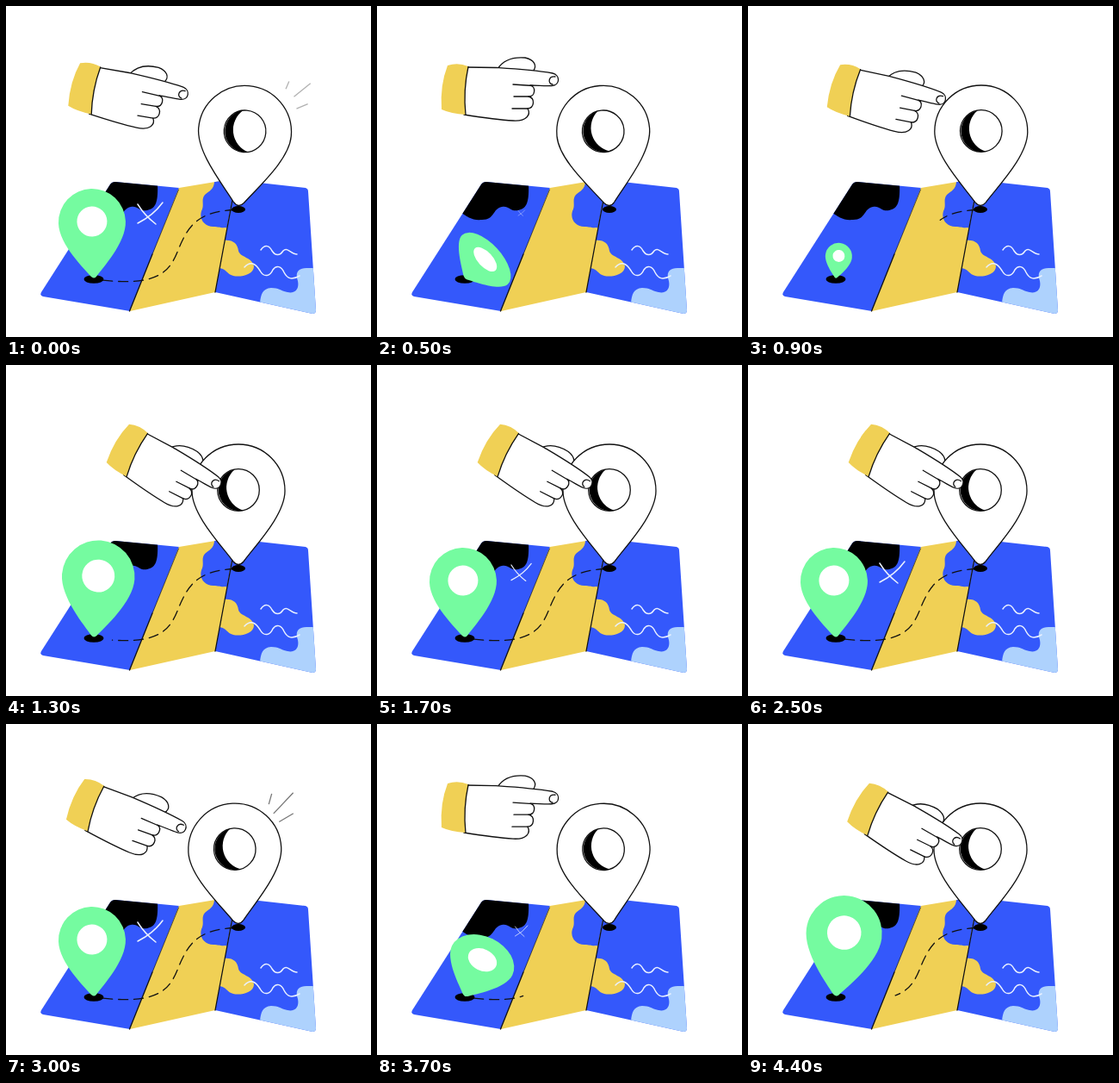
Recreate the animation shown at these times as an HTML page. Size 424 by 384 pixels, loop 4500 ms.

```html
<!DOCTYPE html>
<html lang="en">
<head>
<meta charset="utf-8">
<title>Map route</title>
<style>
  html, body { margin: 0; width: 100%; height: 100%; overflow: hidden; background: #fff; }
  svg { display: block; width: 424px; height: 384px; }
  .line { fill: none; stroke: #111; stroke-width: 1.3; stroke-linecap: round; stroke-linejoin: round; }
  .paper { fill: #fff; }
  .blue { fill: #3458fb; }
  .yellow { fill: #f0d055; }
  .chalk { fill: none; stroke: #e9f0ff; stroke-width: 1.5; stroke-linecap: round; }
</style>
</head>
<body>
<svg viewBox="0 0 424 384">
  <defs>
    <clipPath id="leftPanel"><path d="M127 204L201 211L144 354L43 337Q39 336 41 332L121 207Q123 204 127 204Z"/></clipPath>
    <clipPath id="rightPanel"><path d="M267 202L348 211Q351 212 351 215L360 353Q360 357 356 357L243 332Z"/></clipPath>
    <clipPath id="middlePanel"><path d="M201 211L267 200L243 332L144 354Z"/></clipPath>
    <path id="route" d="M266 236.500C225 238 213 254 203 276S190 327 112 318"/>
    <mask id="routeMask" maskUnits="userSpaceOnUse" x="0" y="0" width="424" height="384">
      <path id="reveal" fill="none" stroke="#fff" stroke-width="8" pathLength="100"/>
    </mask>
  </defs>

  <g clip-path="url(#leftPanel)">
    <rect class="blue" x="35" y="195" width="175" height="165"/>
    <path d="M95 238C106 245 110 249 122 248C137 248 134 235 145 233C153 231 155 239 164 237C174 235 177 228 176 205L100 195Z"/>
  </g>
  <g clip-path="url(#middlePanel)">
    <rect class="yellow" x="140" y="195" width="130" height="165"/>
    <path class="blue" d="M242 200C243 213 236 214 231 219C226 225 231 231 227 238C224 248 231 256 241 256C248 256 250 258 254 257L260 258L272 195Z"/>
  </g>
  <g clip-path="url(#rightPanel)">
    <rect class="blue" x="240" y="195" width="125" height="165"/>
    <path class="yellow" d="M253 272C264 271 269 276 270 284C272 292 286 291 288 302C288 312 272 315 264 313C256 311 257 305 247 304L240 290Z"/>
    <path fill="#aed2fd" d="M362 304H349C338 304 336 311 339 319C341 329 335 334 327 332C318 330 317 327 308 327C298 328 296 334 295 345L362 362Z"/>
  </g>
  <path class="line" d="M170 288L143.500 354M263 225L243 332"/>
  <path class="line" style="stroke-width:.7" d="M200.500 213L170 288"/>
  <path class="chalk" d="M296 283C301 276 306 278 309 284C313 290 318 290 322 284C327 279 331 288 338 288M277 303C284 295 290 299 295 307C300 316 307 313 310 306C314 300 320 302 323 309C327 317 333 318 341 313"/>
  <g mask="url(#routeMask)">
    <use href="#route" class="line" stroke-dasharray="11 7"/>
  </g>
  <path id="cross" class="chalk" d="M-15 -10Q-7 3 6 13M14 -12Q3 3 -15 12"/>
  <ellipse cx="102" cy="317" rx="11.500" ry="4.800"/>
  <ellipse cx="270" cy="236" rx="8" ry="4"/>

  <g id="greenPin">
    <path fill="#75fba0" d="M-3 -2C-10 -11 -39 -40 -39 -65A39 39 0 1 1 39 -65C39 -40 10 -11 3 -2Q0 1 -3 -2Z"/>
    <circle class="paper" cy="-66" r="17.500"/>
  </g>

  <g id="thumb">
    <path class="line" style="fill:#fff" d="M140 73C147 62 160 59 172 60C182 62 187 69 181 76"/>
  </g>

  <g id="whitePin">
    <path class="line" style="fill:#fff" d="M-6 -4C-20 -23 -54 -58 -54 -86A54 54 0 1 1 54 -86C54 -58 20 -23 6 -4Q0 3 -6 -4Z"/>
    <g transform="translate(0 -87)">
      <circle class="line" r="24.300"/>
      <path d="M-4 -24A24.300 24.300 0 1 0 6 23.700A27.600 27.600 0 0 1 -4 -24Z"/>
    </g>
    <path id="sparks" fill="none" stroke="#777" stroke-width="1.300"/>
  </g>

  <g id="hand">
    <path id="fist" class="line" style="fill:#fff"/>
    <path id="nail" class="line"/>
    <path class="line" d="M158 91L181 92.500M159 105H176M157 119H175"/>
  </g>
  <g id="cuff">
    <path class="yellow" d="M106 70Q94 65 82 69Q73 92 75 120Q86 125 103 126Q100 98 106 70Z"/>
    <path class="line" d="M106 70.500Q100 98 103 126"/>
  </g>
</svg>
<script>
const LOOP = 4500, CYCLE = 3300, STEP = 100, LEAD = 700;
const el = id => document.getElementById(id);
const set = (id, name, value) => el(id).setAttribute(name, value);
const clamp = v => Math.min(1, Math.max(0, v));
const ramp = (from, to, t) => clamp((t - from) / (to - from));
const ease = (from, to, t) => {
  const u = ramp(from, to, t);
  return u * u * (3 - 2 * u);
};

// A cycle starts when the hand lets go of the pin; it returns at 1400 ms.
const returning = t => ease(1400, 1850, t);

function drawHand(t) {
  const k = 1 - ease(0, 380, t) + returning(t);
  const turn = 27 * (1 - ease(0, 1150, t) + returning(t));
  const tip = 4 * k;
  const pose = angle => `translate(${48 * k} ${6 * k}) rotate(${angle} 104 98)`;
  set('hand', 'transform', pose(turn));
  set('cuff', 'transform', pose(turn * .85));
  set('thumb', 'transform', `${pose(turn)} translate(${-7 * k} ${3 * k})`);
  set('fist', 'd', `M102 71L138 71.5C162 73 180 74 ${204 - tip} 78` +
    `C${213 - tip} 80 ${213 - tip} 92 ${203 - tip} 92.5C194 93 188 92 178 92` +
    'C185 94 184 105 176 105C184 107 183 118 175 119C179 126 174 134 158 133' +
    'C140 132 120 129 101 126');
  set('nail', 'd', `M${207 - tip} 82C${199 - tip} 81 ${198 - tip} 90 ${204 - tip} 91`);
}

function drawWhitePin(t) {
  const strength = ease(0, 350, t) - ease(1200, 1700, t);
  const sway = 5 * strength * Math.cos((t - 710) / 900 * 2 * Math.PI);
  set('whitePin', 'transform', `translate(270 232) rotate(${sway})`);
}

// Three rays shoot outwards, then fade while their inner ends follow.
function drawSparks(t) {
  const grow = ease(100, 350, t), fade = ease(450, 1000, t);
  const ray = (x, y, dx, dy) => {
    const point = s => `${x + dx * s} ${y + dy * s}`;
    return `M${point(.6 * fade)}L${point(grow)}`;
  };
  set('sparks', 'd', ray(42, -137, 4, -12) + ray(47, -126, 24, -23) + ray(53, -116, 17, -9));
  set('sparks', 'opacity', grow * (1 - fade));
}

// The pin topples over and vanishes, then pops up too large and settles.
function drawGreenPin(t) {
  const rising = t >= 1500;
  const fall = rising ? 0 : ramp(850, 1300, t) ** 1.7;
  const extra = rising ? 1 - ease(1800, 2300, t) : 0;
  const shown = rising ? ease(1500, 1750, t) : 1 - ease(1200, 1330, t);
  const size = shown * (1 + .13 * extra);
  set('greenPin', 'transform', `translate(102 316) rotate(${-1.8 + 75 * fall + 9.3 * extra})` +
    `scale(${size} ${size * (1 - .78 * fall)})`);
}

function drawRoute(t) {
  const back = t >= 1500;
  const start = back ? 0 : 100 * ramp(700, 1180, t) ** 2;
  const end = back ? 100 * (1 - (1 - ramp(1520, 2150, t)) ** 2) : 100;
  set('reveal', 'stroke-dasharray', `0 ${start} ${end - start} 300`);
}

function drawCross(t) {
  const size = 1 - ease(800, 1400, t) + ease(2150, 2500, t);
  set('cross', 'transform', `translate(168 240) scale(${size})`);
  set('cross', 'opacity', size > .01 ? 1 : 0);
}

const parts = [drawHand, drawWhitePin, drawSparks, drawGreenPin, drawRoute, drawCross];
set('reveal', 'd', el('route').getAttribute('d'));

const begin = performance.now();
function tick() {
  const elapsed = (performance.now() - begin) % LOOP;
  const t = (Math.floor(elapsed / STEP) * STEP + LEAD) % CYCLE;
  parts.forEach(draw => draw(t));
  requestAnimationFrame(tick);
}
tick();
</script>
</body>
</html>
```
